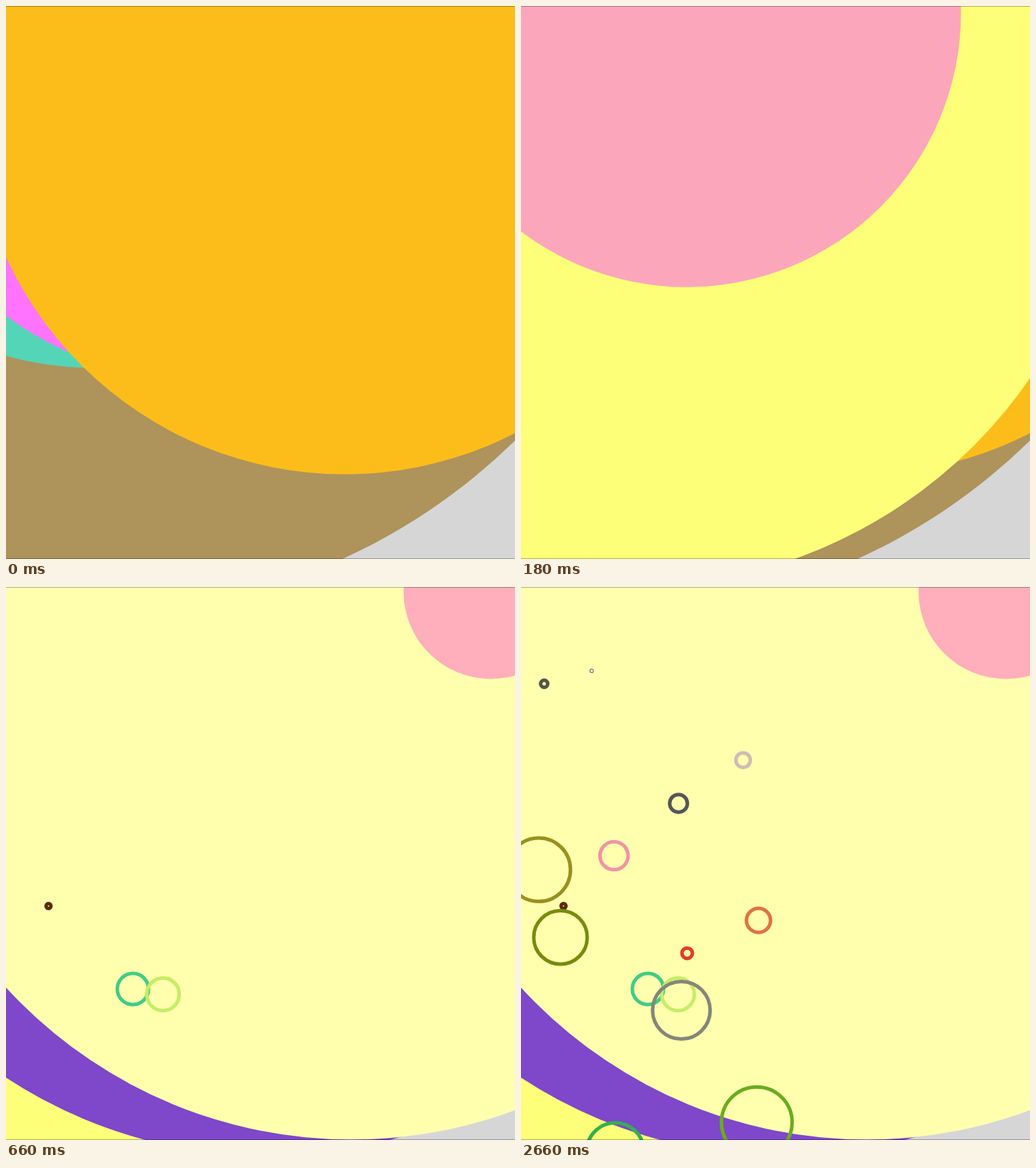
An HTML page without scripts for the animation above (2780 ms loop, 718 by 780 pixels).

```html
<!DOCTYPE html>
<html lang="en">
<head>
<meta charset="utf-8">
<title>Circles</title>
<style>
  @property --t {
    syntax: "<number>";
    inherits: true;
    initial-value: 0;
  }
  html, body { margin: 0; width: 100%; height: 100%; overflow: hidden; background: #d6d6d6; }
  svg { display: block; width: 718px; height: 780px; animation: clock 2780ms linear infinite; }
  @keyframes clock { from { --t: 0 } to { --t: 2780 } }

  /* Each circle pops in once the clock reaches --at (ms). */
  circle { opacity: calc(var(--t) - var(--at, -1) + 1); }
  .rings { fill: none; stroke-width: 5; }
</style>
</head>
<body>
<svg viewBox="0 0 718 780">
  <g class="discs">
    <circle cx="123" cy="6" r="850" fill="#ae935b"/>
    <circle cx="125" cy="42.5" r="468" fill="#55d5b7"/>
    <circle cx="278" cy="64" r="465" fill="#ff73ff"/>
    <circle cx="478" cy="134.5" r="526" fill="#fcbd1b"/>
    <circle cx="274" cy="23" r="558" fill="#a5fe94" style="--at:20"/>
    <circle cx="157.7" cy="139.1" r="680.3" fill="#fdff78" style="--at:100"/>
    <circle cx="233.7" cy="9.5" r="387" fill="#fca6bb" style="--at:180"/>
    <circle cx="369" cy="130.4" r="672" fill="#7f47ca" style="--at:260"/>
    <circle cx="487.5" cy="118.5" r="661" fill="#ffffae" style="--at:340"/>
    <circle cx="684" cy="6.5" r="123.2" fill="#ffaebc" style="--at:420"/>
  </g>
  <g class="rings">
    <circle cx="179" cy="567" r="22" stroke="#43cb86" style="--at:500"/>
    <circle cx="221.5" cy="574.5" r="23" stroke="#c5ed66" style="--at:580"/>
    <circle cx="60" cy="450" r="3.4" stroke="#5a2c0e" style="--at:660"/>
    <circle cx="133" cy="796" r="40.3" stroke="#33b04f" style="--at:980"/>
    <circle cx="226.2" cy="597" r="40.6" stroke="#85867a" style="--at:1140"/>
    <circle cx="25" cy="398.8" r="44.8" stroke="#99911f" style="--at:1460"/>
    <circle cx="99.7" cy="118.3" r=".5" stroke="#5c5c9c" style="--at:1860"/>
    <circle cx="32.7" cy="136.5" r="5" stroke="#54554b" style="--at:1940"/>
    <circle cx="313.3" cy="244.3" r="10.2" stroke="#d0bcb3" style="--at:2020"/>
    <circle cx="131.2" cy="379" r="19.8" stroke="#f492a6" style="--at:2100"/>
    <circle cx="55.7" cy="494.2" r="37.7" stroke="#788b0d" style="--at:2180"/>
    <circle cx="234.4" cy="516.6" r="7.4" stroke="#e03d2a" style="--at:2260"/>
    <circle cx="335" cy="470.2" r="17" stroke="#e07342" style="--at:2340"/>
    <circle cx="222.2" cy="305.2" r="12.5" stroke="#55565c" style="--at:2580"/>
    <circle cx="332.6" cy="755" r="49.8" stroke="#6aac20" style="--at:2660"/>
  </g>
  <path d="M0 .5H718M0 779.5H718" stroke="#000" stroke-opacity=".3"/>
</svg>
</body>
</html>
```
